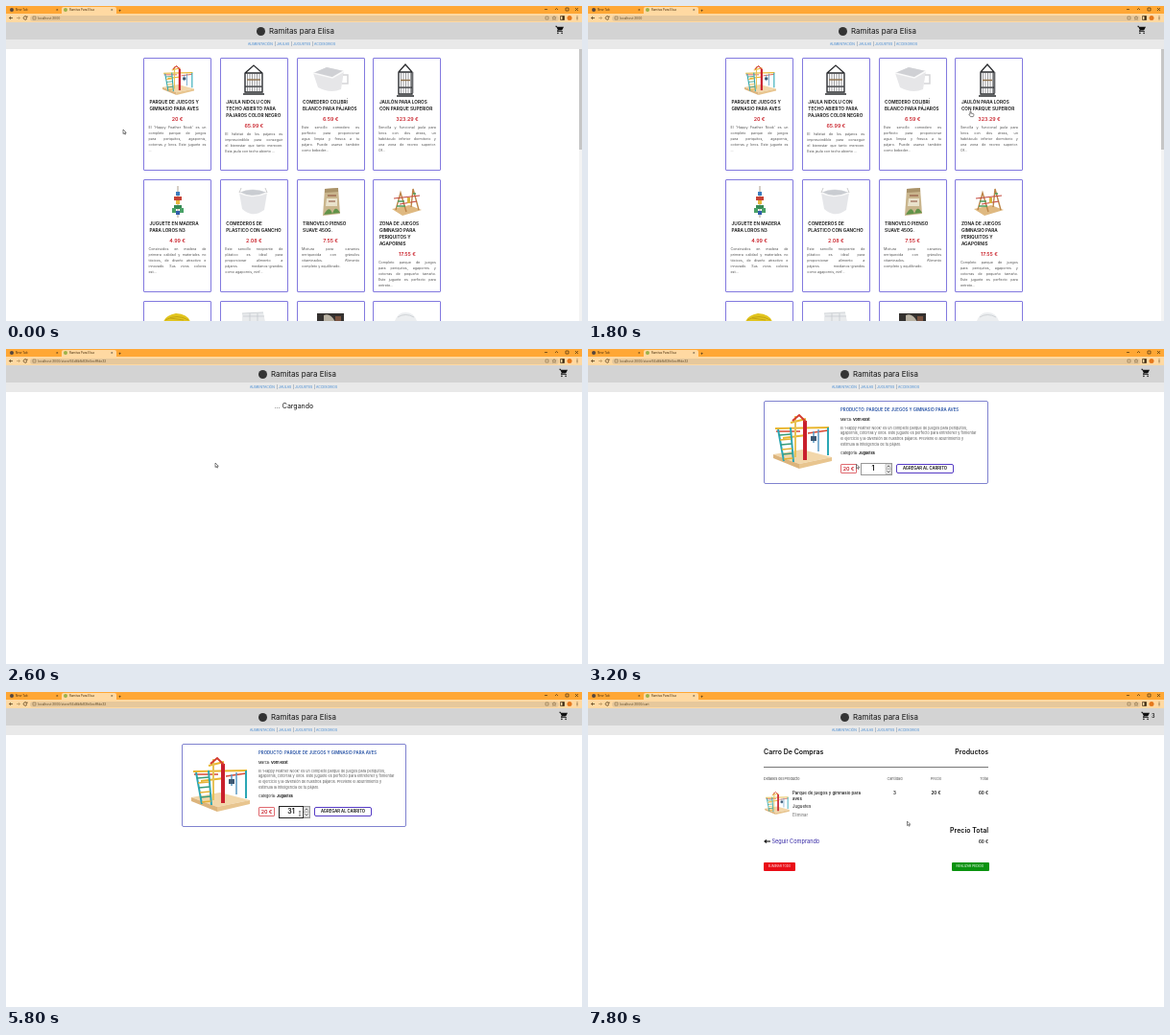
Animation of 600x329 px, one loop 8000 ms. Source, as an HTML page:

```html
<!DOCTYPE html>
<html lang="es">
<head>
<meta charset="utf-8">
<title>Tienda</title>
<style>
html, body { margin: 0; width: 100%; height: 100%; overflow: hidden; background: #fff; }
#stage { position: absolute; left: 0; top: 0; width: 600px; height: 329px; overflow: hidden; font-family: Inter, "Open Sans", sans-serif; color: #111; }
#stage div, #stage svg { position: absolute; box-sizing: border-box; }
#stage svg { overflow: visible; }
.t { line-height: 8px; white-space: pre; }
.c { transform: translateX(-50%); }
.r { transform: translateX(-100%); }
.j { width: 60px; text-align: justify; text-align-last: justify; white-space: nowrap; }
#add.hover { background: #5636c6 !important; border-color: #2d1b85 !important; border-radius: 5px !important; color: #fff; }
</style>
</head>
<body>
<div id="stage"></div>
<script>
const text = (x, y, size, str, css = '', cls = '', id = '') =>
  `<div class="t ${cls}" id="${id}" style="left:${x}px;top:${y - 4}px;font-size:${size}px;${css}">${str}</div>`;
const box = (x, y, w, h, css, inner = '', id = '') =>
  `<div id="${id}" style="left:${x}px;top:${y}px;width:${w}px;height:${h}px;${css}">${inner}</div>`;
const art = (x, y, w, h, vb, inner) =>
  `<svg style="left:${x}px;top:${y}px" width="${w}" height="${h}" viewBox="0 0 ${vb}">${inner}</svg>`;
const line = (d, color, w = 1) => `<path d="${d}" fill="none" stroke="${color}" stroke-width="${w}"/>`;
const fill = (d, color) => `<path d="${d}" fill="${color}"/>`;
const page = (id, inner) => box(0, 0, 600, 329, '', inner, id);
const range = n => [...Array(n).keys()];
const bold = 'font-weight:600;';

// Product pictures
const park =
  fill('M0 42L30 37 61 45 27 52Z', '#f2d7aa') + fill('M0 42L27 52V57L0 46Z', '#dcb47c') + fill('M27 52L61 45V49L27 57Z', '#e8c58f') +
  line('M2 15L58 14M18 9L34 5M10 25L34 22', '#e9b62f', 2) + line('M3 18H28M36 20L57 17', '#d94b36', 1.5) +
  line('M5 16L11 49M18 14L21 50M57 14V43', '#2ba7b5', 2) +
  range(6).map(i => line(`M${6 + i} ${22 + i * 5}l${12 - i * .5} -1`, i % 2 ? '#e5b235' : '#3a9b78', 1.5)).join('') +
  line('M23 2V45', '#e7c258', 2) + line('M33 7V48', '#c91f2c', 4) + line('M20 7L27 1 34 8', '#d43b2f', 2) +
  line('M42 18V30M47 16V39', '#5b9ac5', 1.5) + fill('M39 23h6v5h-6Z', '#3d5974');
const cage = (w, h) =>
  line(`M2 9L${w / 2} 1L${w - 2} 9V${h - 3}H2ZM2 9H${w - 2}M2 ${h * .72}H${w - 2}M0 ${h - 1}H${w}`, '#292b2e', 1.3) +
  range(Math.floor(w / 2.5)).map(i => line(`M${2 + i * 2.5} 9V${h - 4}`, '#55575b', .6)).join('') +
  line(`M4 ${h * .5}H${w - 4}`, '#8d704b', 1.4);
const bowl = fill('M2 5Q16 -2 31 5L28 23Q16 32 5 22Z', '#e5e6e9') + fill('M2 5Q16 -1 31 5Q16 12 2 5', '#c9ccd1') +
  line('M2 5Q16 12 31 5', '#f8f8f8', 1.5) + line('M2 5L4 0M31 5L29 0', '#aaa', .6);
const tub = fill('M0 6L14 0 32 4 29 23Q18 28 5 21Z', '#e6e6e8') + fill('M0 6L14 0 32 4 20 11Z', '#cfd0d4') +
  line('M0 6L20 11 32 4', '#fafafa', 1.5) + line('M31 8h5v9h-6', '#d5d5d8', 1.5);
const toy = line('M6 0V33', '#8c7860', .7) + [['#3b7dbe', 6], ['#c64235', 11], ['#e7b73d', 15], ['#388a55', 20], ['#315eab', 26]]
  .map(([c, y], i) => fill(`M${i % 2 ? 2 : 4} ${y}h${i % 2 ? 8 : 4}v4h-${i % 2 ? 8 : 4}Z`, c)).join('') + fill('M0 23h4v5H0ZM8 23h4v5H8Z', '#4aa268');
const bag = fill('M2 1L16 0 18 27 0 29Z', '#c9b58d') + fill('M2 1L16 0V4L2 5Z', '#a99269') +
  fill('M4 11h11v8H3Z', '#e9e2cc') + fill('M1 28Q7 17 10 27Q13 17 18 26Z', '#629349') + line('M5 8h9M6 14h7', '#8a4a38', 1.2);
const gym = fill('M0 22L18 18 31 23 11 29Z', '#dfb981') + line('M4 23L9 5 15 25M20 20L22 1 28 23', '#bc8548', 1.4) +
  line('M2 11L29 8M8 17L26 14', '#c5493d', 1.2) + line('M6 14h7M5 19h9M22 6h3', '#4c9c5c', 1.3) + fill('M16 10h3v6h-3Z', '#d7b23d');
const nest = fill('M0 9Q2 2 13 0Q26 1 28 9Z', '#e2c51e') + line('M2 7Q14 0 26 7M7 5L21 7', '#bd9d12', .8);
const crate = fill('M0 1L22 0 24 10H0Z', '#e9ebed') + line('M0 1L22 0M1 4H23M8 1V9M16 1V9', '#c2c6cb', .7);
const sack = fill('M0 0H28V9H0Z', '#34312f') + fill('M7 2Q14 -1 19 9H7Z', '#b9b2a3') + fill('M19 3h6v6h-6Z', '#79523f');
const dish = fill('M0 9Q3 0 11 0Q20 0 23 9Z', '#eceef0') + line('M3 5Q11 0 20 5', '#c8ccd0', .8);

const cards = [
  ['PARQUE DE JUEGOS Y|GIMNASIO PARA AVES', '20 €', "El 'Happy Feather Nook' es un|completo parque de juegos|para periquitos, agapornis,|cotorras y loros. Este juguete es|...", [20, 8, 33, 31, '61 57', park]],
  ['JAULA NIDOLU CON|TECHO ABIERTO PARA|PÁJAROS COLOR NEGRO', '65.99 €', 'El hábitat de los pájaros es|imprescindible para conseguir|el bienestar que tanto merecen.|Esta jaula con techo abierto ...', [24, 7, 22, 32, '22 32', cage(22, 32)]],
  ['COMEDERO COLIBRÍ|BLANCO PARA PÁJAROS', '6.59 €', 'Este sencillo comedero es|perfecto para proporcionar|agua limpia y fresca a tu|pájaro. Puede usarse también|como bebeder...', [17, 10, 36, 27, '36 27', tub]],
  ['JAULÓN PARA LOROS|CON PARQUE SUPERIOR', '323.29 €', 'Sencilla y funcional jaula para|loros con dos áreas, un|habitáculo inferior dormitorio y|una zona de recreo superior.|Of...', [25, 6, 18, 35, '18 35', cage(18, 35)]],
  ['JUGUETE EN MADERA|PARA LOROS N3', '4.99 €', 'Construidos en madera de|primera calidad y materiales no|tóxicos, de diseño atractivo e|innovado. Sus vivos colores|est...', [30, 7, 12, 33, '12 33', toy]],
  ['COMEDEROS DE|PLÁSTICO CON GANCHO', '2.08 €', 'Este sencillo recipiente de|plástico es ideal para|proporcionar alimento a|pájaros medianos-grandes|como agapornis, ninf...', [18, 9, 33, 30, '33 30', bowl]],
  ['TRINOVELO PIENSO|SUAVE 450G.', '7.55 €', 'Mixtura para canarios|enriquecida con gránulos|vitaminados. Alimento|completo y equilibrado.', [27, 9, 18, 29, '18 29', bag]],
  ['ZONA DE JUEGOS|GIMNASIO PARA|PERIQUITOS Y|AGAPORNIS', '17.55 €', 'Completo parque de juegos|para periquitos, agapornis y|cotorras de pequeño tamaño.|Este juguete es perfecto para|entrete...', [20, 9, 31, 29, '31 29', gym]],
  ['', '', '', [21, 13, 28, 9, '28 9', nest]],
  ['', '', '', [23, 12, 24, 10, '24 10', crate]],
  ['', '', '', [21, 13, 28, 9, '28 9', sack]],
  ['', '', '', [23, 12, 23, 10, '23 10', dish]]
];

function card([title, price, desc, pic], i) {
  const x = 143 + i % 4 * 79.8, y = 54 + Math.floor(i / 4) * 127;
  const names = title.split('|'), lines = desc.split('|');
  const priceY = y + 49.5 + names.length * 7;
  const [px, py, ...rest] = pic;
  return box(x, y, 71, 117.5, 'border:1px solid #8279df;border-radius:1px') + art(x + px, y + py, ...rest) +
    names.map((s, k) => text(x + 6.5, y + 45.5 + k * 7, 4.7, s, bold)).join('') +
    text(x + 35.5, priceY, 5.3, price, bold + 'color:#c92029', 'c') +
    lines.map((s, k) => text(x + 5.5, priceY + 9 + k * 6.1, 3.65, s, 'color:#555', k < lines.length - 1 ? 'j' : '')).join('');
}

const browser =
  box(0, 0, 600, 8, 'background:#ffa735') + box(58, 1, 57, 8, 'background:#ffd9a2;border-radius:2px 2px 0 0') +
  box(0, 8, 600, 9, 'background:#ffd9a2') + box(25, 9.5, 551, 6, 'background:#e6c89c;border-radius:3px') +
  box(4, 2, 4, 4, 'background:#55463d;border-radius:50%') + text(10, 4, 3, 'New Tab', 'color:#4b310e') +
  box(60, 2, 4, 4, 'background:#9bb147;border-radius:50%') + text(66, 4, 3, 'Ramitas Para Elisa', 'color:#4b310e') +
  text(52, 4, 4, '×') + text(109, 4, 4, '×') + text(117, 4, 5, '+') +
  art(0, 0, 600, 17, '600 17',
    line('M7 12.5H3.5M5 11L3.5 12.5 5 14M561 3.5h3M583 2h3v3h-3ZM593 2l3 3M596 2l-3 3M572 4l1.5-1.5L575 4', '#49320f', .7) +
    line('M11 12.5h3.5M13 11l1.5 1.5L13 14', '#b6935c', .7) +
    line('M21.6 11.5A1.8 1.8 0 1 0 21.8 13M22 10.4V12h-1.6', '#49320f', .7) +
    line('M28 11h3v3h-3ZM562 11h3v3h-3ZM571 10.5l.6 1.3 1.4.1-1 1 .3 1.4-1.3-.7-1.3.7.3-1.4-1-1 1.4-.1Z', '#725a36', .5) +
    line('M577.5 10.5h4v4h-4Z', '#3c2c15', .7) + fill('M579.5 10.5h2v4h-2Z', '#3c2c15') +
    '<circle cx="587" cy="12.5" r="2.5" fill="#e5781c"/>' + line('M595 10.5v.9M595 12v.9M595 13.5v.9', '#49320f', .9)) +
  text(33, 12.5, 3.3, '', 'color:#604b2b', '', 'url');

const cartIcon = fill('M7 18c-1.1 0-2 .9-2 2s.9 2 2 2 2-.9 2-2-.9-2-2-2zM1 2v2h2l3.6 7.6-1.4 2.4C4.5 15.4 5.5 17 7 17h12v-2H7.4l1.1-2H16c.7 0 1.4-.4 1.7-1L21.7 4H5.2l-.9-2zM17 18c-1.1 0-2 .9-2 2s.9 2 2 2 2-.9 2-2-.9-2-2-2z', '#111');
const header =
  box(0, 17, 600, 17.5, 'background:#d3d3d3') + box(0, 34.5, 600, 10, 'background:#e9e9e9') +
  box(0, 0, 600, 45, '',
    box(262.5, 21.5, 9, 9, 'background:#333;border-radius:50%') +
    text(276, 25.5, 7.9, 'Ramitas para Elisa', 'font-family:"Liberation Serif",serif;font-style:italic;font-weight:bold') +
    [['ALIMENTACIÓN', 254], ['JAULAS', 284], ['JUGUETES', 301], ['ACCESORIOS', 323]]
      .map(([s, x], i) => text(x, 39.5, 3.45, s, 'color:#3f87d2') + (i ? box(x - 2.2, 37, .5, 5, 'background:#b4bdc7') : '')).join(''), 'brand') +
  box(0, 0, 600, 45, '', art(575.5, 20, 10, 10, '24 24', cartIcon), 'cart') +
  text(587, 25, 5.5, '3', bold, '', 'badge');

const list = cards.map(card).join('') +
  box(596.5, 17, 3.5, 312, 'background:#f3f3f3') + box(597, 20, 2.5, 130, 'background:#c6c6c6');

const loading = text(300, 60, 7, '... Cargando', 'font-family:"Open Sans",sans-serif;font-weight:700', 'c');

const small = 'color:#555;';
const product =
  box(183, 54, 234, 87, 'border:1px solid #7f82cf;border-radius:2px') + art(193, 67.5, 61, 57, '61 57', park) +
  text(263, 64, 4.35, 'PRODUCTO: PARQUE DE JUEGOS Y GIMNASIO PARA AVES', bold + 'color:#2450a4') +
  text(263, 74, 3.7, 'Marca: <b>Vorn Kest</b>') +
  ["El 'Happy Feather Nook' es un completo parque de juegos para periquitos,",
    'agapornis, cotorras y loros. Este juguete es perfecto para entretener y fomentar',
    'el ejercicio y la diversión de nuestros pájaros. Previene el aburrimiento y',
    'estimula la inteligencia de tu pájaro.'].map((s, i) => text(263, 82.5 + i * 5.9, 3.75, s, small)).join('') +
  text(263, 108.5, 3.7, 'Categoría: <b>Juguetes</b>') +
  box(263, 120, 17, 10, 'border:1px solid #e06a70;border-radius:1px') + text(271.5, 125, 5.3, '20 €', bold + 'color:#c92029', 'c') +
  box(284, 119, 33, 12.5, 'border:1px solid #999') + box(284, 119, 26, 12.5, 'border:1px solid #222', '', 'focus') +
  text(297, 125.2, 7, '1', bold, 'c', 'qty') +
  art(309, 119, 8, 12, '8 12', fill('M1 1h6v5H1ZM1 6.5h6v5H1Z', '#eee') + line('M1 1h6v5H1ZM1 6.5h6v5H1Z', '#999', .5) + line('M2.5 4.4L4 2.8 5.5 4.4M2.5 8.3L4 9.9 5.5 8.3', '#333', .8)) +
  box(321, 120, 60, 9.5, 'border:1px solid #563bc5;border-radius:2px',
    text(29, 3.7, 4.2, 'AGREGAR AL CARRITO', bold, 'c'), 'add');

const medium = 'font-weight:500;';
const basket =
  text(183, 63, 7, 'Carro De Compras', bold) + text(417, 63, 7, 'Productos', bold, 'r') + box(183, 77.5, 234, .8, 'background:#777') +
  text(183, 91, 3.7, 'Detalles del Producto', small + medium) + text(319.5, 91, 3.8, 'Cantidad', small, 'c') +
  text(362.5, 91, 3.8, 'Precio', small, 'c') + text(417, 91, 3.8, 'Total', small, 'r') +
  art(184, 104, 26, 24, '61 57', park) +
  text(213, 106, 4.4, 'Parque de juegos y gimnasio para', medium) + text(213, 111.5, 4.4, 'aves', medium) +
  text(213, 120, 4.4, 'Juguetes') + text(213, 128.5, 4.3, 'Eliminar', 'color:#666') +
  text(319.5, 106, 4.5, '3', bold, 'c') + text(362.5, 106, 4.5, '20 €', bold, 'c') + text(417, 106, 4.5, '60 €', bold, 'r') +
  text(417, 144.5, 7, 'Precio Total', bold, 'r') + text(417, 156.5, 4.5, '60 €', bold, 'r') +
  art(183, 153, 7, 6, '7 6', line('M7 3H1', '#222', 1.2) + fill('M0 3L3 .7V5.3Z', '#222')) +
  text(191.5, 156, 5.6, 'Seguir Comprando', 'color:#3022a3') +
  box(183, 178, 33, 8.5, 'background:#e90c16;border-radius:1px') + text(199.5, 182.2, 3, 'ELIMINAR TODO', 'color:#fff', 'c') +
  box(378.5, 178, 39, 8.5, 'background:#0a930f;border-radius:1px') + text(398, 182.2, 3.3, 'REALIZAR PEDIDO', 'color:#fff', 'c');

const pointers = {
  arrow: 'M0 0V4.6L1.1 3.6 1.9 5.2 2.6 4.9 1.9 3.3H3.3Z',
  hand: 'M0 0Q.6-.5 1 .1V2L3.5 2.6Q4.1 3 3.8 4.3L3.2 5.6H.6L-1.2 3.3Q-1 2.6 0 3.2Z',
  beam: 'M-1-2.3H1M0-2.3V2.3M-1 2.3H1'
};
const pointer = art(0, 0, 600, 329, '600 329', '<path id="pointer" fill="#fff" stroke="#222" stroke-width=".55"/>');

const $ = id => document.getElementById(id);
const pages = { list, loading, product, basket };
$('stage').innerHTML = Object.entries(pages).map(([id, html]) => page(id, html)).join('') + header + browser + pointer;

// Pointer stops: time, x, y
const path = [[0, 122, 129], [1000, 262, 120], [1200, 262, 120], [1800, 398, 110], [2400, 195, 112], [2600, 218, 119],
  [3600, 313, 121], [4000, 313, 121], [4200, 304.5, 126], [5000, 304.5, 126], [5400, 306, 127], [5800, 306, 127],
  [6800, 354, 126], [7000, 351, 128], [7800, 332.5, 135], [8000, 332.5, 135]];

function place(t) {
  const i = path.findIndex(p => p[0] > t), [t0, x0, y0] = path[i - 1], [t1, x1, y1] = path[i];
  const k = (t - t0) / (t1 - t0), e = k * k * (3 - 2 * k);
  return [x0 + (x1 - x0) * e, y0 + (y1 - y0) * e];
}
const show = (id, on) => $(id).style.display = on ? '' : 'none';

function draw(now) {
  const t = Math.floor(now % 8000 / 200) * 200;
  const current = t < 2600 ? 'list' : t < 2800 ? 'loading' : t < 7000 ? 'product' : 'basket';
  const [x, y] = place(t), isList = current === 'list', isProduct = current === 'product';
  Object.keys(pages).forEach(id => show(id, id === current));
  $('brand').style.left = isList ? '-2px' : '0';
  $('cart').style.left = isList ? '-4px' : '0';
  show('badge', current === 'basket');
  $('url').textContent = 'localhost:3000' + { list: '', basket: '/cart' }[current] ?? '';
  if (!isList && current !== 'basket') $('url').textContent = 'localhost:3000/store/64d6bfb83fe5ecfffde32';
  $('qty').textContent = t < 3800 ? 1 : t < 4000 ? 2 : t >= 4800 && t < 6000 ? 31 : 3;
  show('focus', t >= 4800 && t < 6200);
  const overAdd = isProduct && x > 321 && y > 120;
  $('add').className = overAdd ? 'hover' : '';
  const overCard = isList && x > 143 && (x - 143) % 79.8 < 71;
  const overQty = isProduct && x > 284 && x < 309 && y > 119;
  const kind = overAdd || overCard ? 'hand' : overQty ? 'beam' : 'arrow';
  $('pointer').setAttribute('d', pointers[kind]);
  $('pointer').setAttribute('transform', `translate(${x} ${y})`);
  requestAnimationFrame(tick);
}
const start = performance.now();
const tick = () => draw(performance.now() - start);
tick();
</script>
</body>
</html>
```
